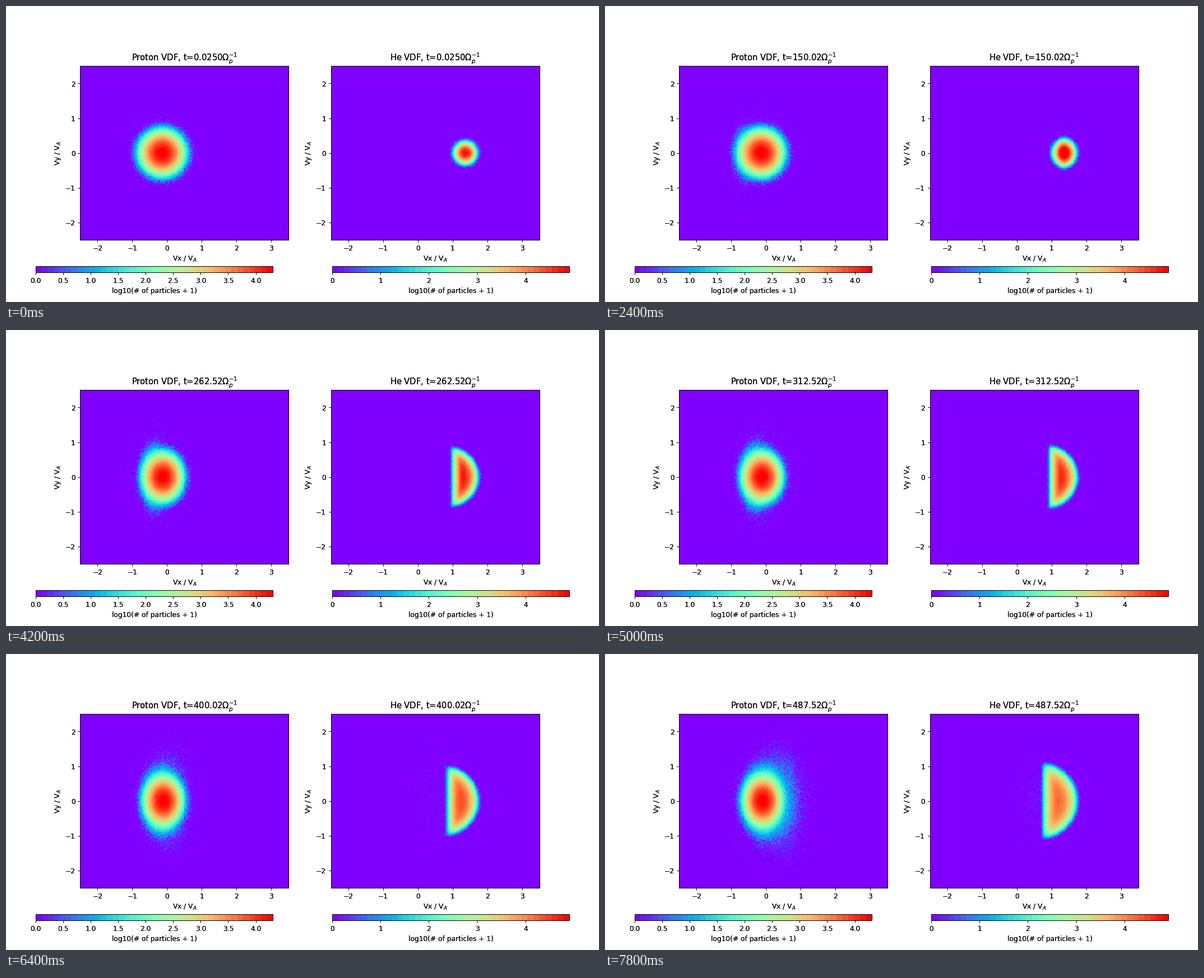
A matplotlib script that plays this animation: 1058 by 529 pixels, repeating every 8000 ms.

```python
import numpy as np
import matplotlib.pyplot as plt
from matplotlib.animation import FuncAnimation

WIDTH, HEIGHT, DPI = 1058, 529, 529 / 6
FRAMES, INTERVAL = 40, 200
ONSET, SATURATION = 6, 21  # frames between which the instability grows
BINS = 200
X_RANGE, Y_RANGE = (-2.5, 3.5), (-2.5, 2.5)
PROTON_MAX, HELIUM_MAX = 4.311, 4.904
CMAP = plt.get_cmap("rainbow", 40)


def centres(limits):
    edges = np.linspace(*limits, BINS + 1)
    return (edges[:-1] + edges[1:]) / 2


VX, VY = np.meshgrid(centres(X_RANGE), centres(Y_RANGE))


def phases(frame):
    """Growth of the instability, then the slow spreading after it saturates."""
    growth = np.clip((frame - ONSET) / (SATURATION - ONSET), 0, 1) ** 2
    spread = np.clip((frame - SATURATION) / (FRAMES - 1 - SATURATION), 0, 1)
    return growth, spread


def blob(height, x, x_width, y_width):
    return height * np.exp(-((VX - x) / x_width) ** 2 / 2 - (VY / y_width) ** 2 / 2)


def depth(inward, curvature):
    """How far each cell lies inside a circular edge that crosses Vy = 0."""
    return inward - curvature / 2 * (inward**2 + VY**2)


def proton_density(frame):
    grow, spread = phases(frame)
    core = blob(10**PROTON_MAX, -0.14 + 0.02 * (grow + spread),
                0.2 - 0.026 * grow - 0.004 * spread,
                0.2 + 0.012 * grow + 0.015 * spread)
    wings = blob(grow * 10**2.6, -0.6 + 0.25 * grow + 0.3 * spread,
                 0.145 + 0.07 * spread, 0.29 + 0.01 * grow + 0.06 * spread)
    halo = blob(2 * grow + 10 * spread, -0.35 + 0.75 * spread,
                0.15 + 0.12 * spread, 0.5 + 0.08 * spread)
    return core + wings + halo


def helium_density(frame):
    """A round beam whose left side flattens while its right arc widens."""
    grow, spread = phases(frame)
    left = depth(VX - 0.917 + 0.24 * spread, 2.29 * (1 - grow))
    right = depth(1.79 - VX, 1 / (0.437 + 0.46 * grow + 0.24 * spread))
    soft = 0.005 + 0.03 * (grow + spread)
    inside = -soft * np.logaddexp(-left / soft, -right / soft)
    slope = 22.4 + 6 * grow - 4 * spread
    flatten = 0.002 + 0.17 * grow + 0.04 * spread
    level = (1 - np.exp(-inside * slope * flatten)) / flatten
    return 10**level + blob(0.2 * spread**2, 0.55, 0.25, 0.55)


def histogram(density, frame):
    rng = np.random.default_rng(frame)
    return np.log10(rng.poisson(density(frame)) + 1)


def time_text(frame):
    return f"{0.025 + 12.5 * frame:.4f}"[:6]


def add_axes(x0, y0, x1, y1):
    """Axes from pixel corners, counted from the top left of the stage."""
    return fig.add_axes([x0 / WIDTH, 1 - y1 / HEIGHT,
                         (x1 - x0) / WIDTH, (y1 - y0) / HEIGHT])


def embolden(*artists):
    """Draw each artist twice, which darkens its smoothed edges."""
    for artist in artists:
        def draw_twice(renderer, draw=artist.draw):
            draw(renderer)
            draw(renderer)
        artist.draw = draw_twice


def make_panel(x0, x1, bar_x, vmax, bar_ticks):
    ax = add_axes(x0, 107.4, x1, 418.4)
    image = ax.imshow(np.zeros((BINS, BINS)), cmap=CMAP, vmin=0, vmax=vmax,
                      extent=(*X_RANGE, *Y_RANGE), origin="lower",
                      aspect="auto", interpolation="nearest")
    ax.set_xticks(range(-2, 4))
    ax.set_yticks(range(-2, 3))
    ax.set_xlabel("Vx / V$_A$")
    ax.set_ylabel("Vy / V$_A$")
    bar_ax = add_axes(bar_x, 465.2, bar_x + 0.4 * WIDTH, 476.1)
    bar = fig.colorbar(image, cax=bar_ax, orientation="horizontal", ticks=bar_ticks)
    bar.set_label("log10(# of particles + 1)")
    title = ax.set_title("")
    embolden(ax.xaxis, ax.yaxis, bar_ax.xaxis, title)
    return image, title


plt.rcParams["font.family"] = "DejaVu Sans"
fig = plt.figure(figsize=(WIDTH / DPI, HEIGHT / DPI), dpi=DPI, facecolor="white")
panels = [
    ("Proton", proton_density,
     *make_panel(132.2, 504.4, 52.9, PROTON_MAX, np.arange(0, 4.1, 0.5))),
    ("He", helium_density,
     *make_panel(579.5, 952.2, 581.9, HELIUM_MAX, range(5))),
]


def update(frame):
    for name, density, image, title in panels:
        image.set_data(histogram(density, frame))
        title.set_text(rf"{name} VDF, t={time_text(frame)}$\Omega_p^{{-1}}$")
    return [artist for panel in panels for artist in panel[2:]]


anim = FuncAnimation(fig, update, frames=FRAMES, interval=INTERVAL,
                     repeat=True, repeat_delay=0, blit=False)
plt.show()
```
